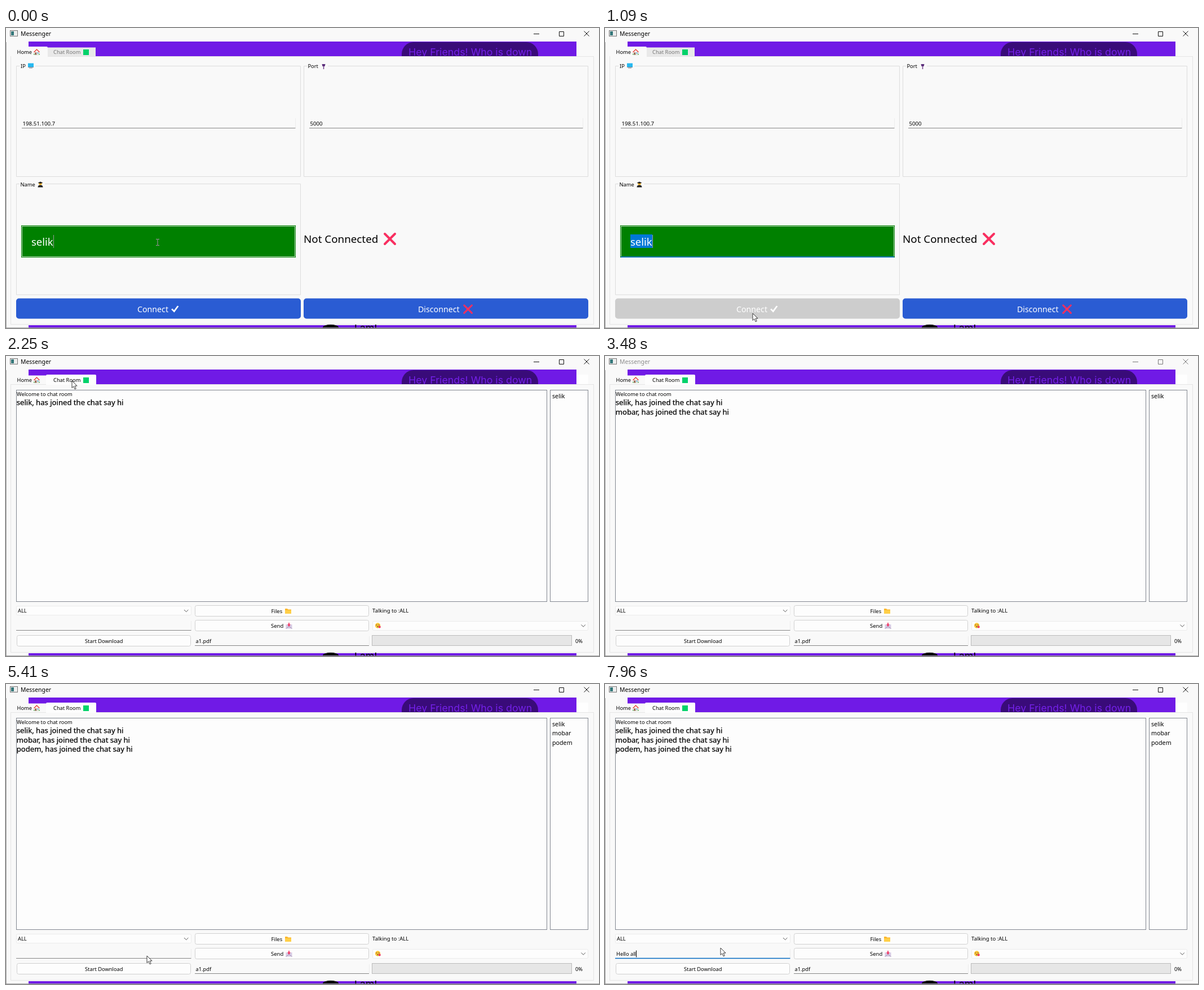
Animation, 1052 px wide and 532 px high, one loop 8000 ms. Source, as an HTML page:

```html
<!DOCTYPE html>
<html lang="en">
<head>
<meta charset="utf-8">
<title>Messenger</title>
<style>
  html, body { margin: 0; width: 100%; height: 100%; overflow: hidden; background: #f9f9f9; }
  svg { display: block; }
  text { font: 9.3px "Noto Sans", sans-serif; fill: #000; white-space: pre; }
  .num { font-size: 9.7px; }
  .title { font-size: 10.4px; }
  .list { font-size: 10.7px; }
  .chat { font-size: 13.1px; stroke: #000; stroke-width: .25px; }
  .button { font-size: 14.2px; fill: #fff; }
  .large { font-size: 18.8px; }
  .behind { font: 17.8px Inter, sans-serif; fill: #7420e8; }
  .group { fill: none; stroke: #dcdcdc; }
  .page { fill: #f9f9f9; }
  .pane { fill: #fdfdfd; stroke: #828790; }
  .soft { fill: #fdfdfd; stroke: #d0d0d0; }
  .combo { fill: #fdfdfd; stroke: #ebebeb; }
  .edge { fill: none; stroke: #ececec; }
  .under { stroke: #868686; }
  .chevron { fill: none; stroke: #555; }
  .blue { fill: #2a5cd3; }
</style>
</head>
<body>
<svg width="1052" height="532" viewBox="0 0 1052 532">
  <defs>
    <g id="house">
      <path d="M0 8.500h11v2H0z" fill="#4fae5a"/>
      <path d="M1.500 5h8v5.500h-8z" fill="#f1e4dc"/>
      <path d="M0 5.500 5.500 0 11 5.500 10 6.500 5.500 2 1 6.500z" fill="#e8403c"/>
      <path d="M2.500 6.500h2.500v4h-2.500z" fill="#8c5543"/>
      <path d="M6.500 6.500h2v2h-2z" fill="#35a6e0"/>
    </g>
    <path id="cross" d="M1 1 19 19M19 1 1 19" fill="none" stroke="#f92f60" stroke-width="4" stroke-linecap="round"/>
  </defs>

  <rect class="page" width="1052" height="532"/>

  <!-- wallpaper window showing through -->
  <path d="M40 24h972V50H40zM40 527h972v4.500H40z" fill="#701ae6"/>
  <path d="M702 50V46a21 21 0 0 1 21-21h200a21 21 0 0 1 21 21v4z" fill="#390b79"/>
  <text class="behind" x="714" y="48.500">Hey Friends! Who is down</text>
  <path d="M562 531a14 5 0 0 1 28 0z"/>
  <text class="behind" x="618" y="538" style="fill:#000">I am!</text>

  <!-- title bar -->
  <g id="titleBar">
    <rect x="7.500" y="4.500" width="13" height="10" fill="#eee" stroke="#777"/>
    <rect x="9" y="6" width="5" height="7" fill="#35777a"/>
    <text class="title" id="title" x="26" y="14">Messenger</text>
    <path id="controls" d="M936 10.500h10M981.500 6.500h8v8h-8zM1025.500 5.500l9 9M1034.500 5.500l-9 9" fill="none" stroke="#111"/>
  </g>

  <rect class="page" x="8.500" y="50.500" width="1034" height="475" stroke="#e5e5e5"/>

  <g id="home">
    <path class="page" d="M9 51V35q0-2 2-2h61q2 0 2 2v16z"/>
    <path d="M74 50V34.500h85V50z" fill="#e9e9e9"/>

    <path class="group" d="M24 67.500h-5.500v196h504v-196H52"/>
    <path class="group" d="M534 67.500h-5.500v196h504v-196H571"/>
    <path class="group" d="M24 276.500h-5.500v196.500h504V276.500H69"/>
    <text x="26" y="70.500">IP</text>
    <text x="535.500" y="70.500">Port</text>
    <text x="25.500" y="280.500">Name</text>

    <path d="M39 62.500h10v7H39z" fill="#26b9f1"/>
    <path d="M41 71h6M39 69.500h10" stroke="#7b8794"/>
    <path d="M560.500 64h6l-1 4h-4z" fill="#5a2d7a"/>
    <path d="M563.500 67v6" stroke="#76458f" stroke-width="1.500"/>
    <circle cx="61" cy="276" r="2.800" fill="#f5b62c"/>
    <path d="M56.500 274.500l4.500-2 4.500 2-4.500 1.500zM56.500 282.500q0-4 4.500-4t4.500 4z" fill="#222"/>

    <path class="edge" d="M513.500 160V177M1023.500 160V177"/>
    <path class="under" d="M28 177.500h485.500M538 177.500h485.500"/>
    <text class="num" x="29.500" y="172.500">198.51.100.7</text>
    <text class="num" x="539.500" y="172.500">5000</text>

    <rect x="27" y="350" width="487" height="57" fill="#008000"/>
    <rect x="28.500" y="351.500" width="484" height="54" fill="none" stroke="#c4dfc4"/>
    <path id="nameFocus" d="M28 406h485" stroke="#0a78b4" stroke-width="2"/>
    <rect id="selection" x="45" y="366" width="39" height="24" fill="#0078d7"/>
    <text class="large" x="45" y="386" style="fill:#fff;font-size:18.500px">selik</text>
    <path id="nameCaret" d="M84.500 367v23" stroke="#999"/>

    <text class="large" id="status" x="528" y="381"></text>
    <use id="offline" href="#cross" x="671" y="364"/>
    <g id="online">
      <rect x="633" y="363.500" width="21" height="21" rx="3" fill="#00d26a"/>
      <path d="M637.500 374.500l4 4 8-9" fill="none" stroke="#fff" stroke-width="2.500" stroke-linecap="round"/>
    </g>

    <rect class="blue" id="connect" x="18" y="479.500" width="505" height="36" rx="5"/>
    <text class="button" x="233" y="503.500">Connect</text>
    <path d="M293 499l2.500-1.500 2.500 3 6-8 2.500 1-8 11z" fill="#fff"/>
    <rect class="blue" x="528" y="479.500" width="505" height="36" rx="5"/>
    <text class="button" x="731" y="503.500">Disconnect</text>
    <use href="#cross" transform="translate(812 491) scale(.76)"/>
  </g>

  <g id="room">
    <path d="M1012 33h21v17h-21z" fill="#fefefe"/>
    <path class="page" d="M10 50V34.500h61V50z"/>
    <path d="M71 51V35q0-2 2-2h85q2 0 2 2v16z" fill="#fdfdfd"/>

    <rect class="pane" x="18.500" y="60.500" width="941" height="375"/>
    <rect class="pane" x="965.500" y="60.500" width="67" height="375"/>
    <text x="19" y="70.500">Welcome to chat room</text>
    <g id="joins"></g>
    <g id="members"></g>

    <rect class="combo" x="18.500" y="443.500" width="310" height="16" rx="2"/>
    <rect class="combo" x="650.500" y="470.500" width="382" height="16" rx="2"/>
    <path class="chevron" d="M316 450l3.700 3.700 3.700-3.700M1020.500 476.500l3.700 3.700 3.700-3.700"/>
    <text x="21" y="455">ALL</text>
    <text x="650" y="455" style="font-size:9.500px">Talking to :ALL</text>

    <rect class="soft" x="335.500" y="442.500" width="308" height="19" rx="3"/>
    <rect class="soft" x="335.500" y="468.500" width="308" height="19" rx="3"/>
    <rect class="soft" x="19.500" y="495.500" width="308" height="19" rx="3"/>
    <text x="470.500" y="455.500" style="font-size:9.500px">Files</text>
    <text x="470" y="482" style="font-size:9.500px">Send</text>
    <text x="140" y="508.500">Start Download</text>

    <path d="M495 448h4l1.500 1.500h5.500v7.500h-11z" fill="#fbb72c"/>
    <path d="M495 451h11v6h-11z" fill="#ffcf48"/>
    <path d="M496.500 476h11v7.500h-11z" fill="#d8cce4"/>
    <path d="M496.500 483.500l5.500-4 5.500 4" fill="none" stroke="#a594b8"/>
    <path d="M502 473v5m-2-2l2 2.500 2-2.500" fill="none" stroke="#f0315f" stroke-width="1.700"/>
    <circle cx="659.500" cy="478" r="4.700" fill="#ffc83a"/>
    <path d="M656.500 477h2M660.500 477h2" stroke="#5b3427"/>
    <circle cx="659.500" cy="480" r="1" fill="#5b3427"/>
    <circle cx="662.800" cy="480.500" r="1.900" fill="#f0315f"/>

    <path class="edge" d="M328.500 470v16M644.500 497v16"/>
    <path class="under" id="entryLine" d="M18 486.500h310.500"/>
    <path class="under" d="M335 513.500h309"/>
    <text id="entry" x="20" y="482"></text>
    <path id="entryCaret" d="M0 472.500v12" stroke="#000"/>
    <text x="336.500" y="508.500">a1.pdf</text>
    <rect x="649.500" y="495.500" width="354" height="18" fill="#e6e6e6" stroke="#bcbcbc"/>
    <text x="1010" y="508.500">0%</text>
  </g>

  <text x="19.500" y="45.500">Home</text>
  <text id="roomLabel" x="84" y="45.700">Chat Room</text>
  <use href="#house" x="49" y="37"/>
  <rect x="137" y="38" width="10" height="10" fill="#00d26a"/>

  <path d="M.500 25V532M0 531.500h1052" stroke="#8b8b8b" stroke-opacity=".7"/>

  <path id="beam" d="M266 374.500h2.500l.500.500.500-.500h2.500M269 375v10M266 385.500h2.500l.500-.500.500.500h2.500" fill="none" stroke="#b08fb0"/>
  <path id="arrow" d="M0 0v12.500l2.900-2.700 2.200 5 2.100-.9-2.100-4.900h4z" fill="#fff" stroke="#222" stroke-width=".9"/>
</svg>

<script>
const LOOP = 8000;
const $ = id => document.getElementById(id);
const show = (id, on) => $(id).setAttribute('visibility', on ? 'inherit' : 'hidden');
const between = (t, from, to) => t >= from && t < to;

// Times when each person's chat line and list entry appear.
const people = [
  { name: 'selik', joined: 0, listed: 0 },
  { name: 'mobar', joined: 3480, listed: 3780 },
  { name: 'podem', joined: 4620, listed: 4770 }
];
people.forEach(({ name }, i) => {
  $('joins').innerHTML +=
    `<text class="chat" x="18.800" y="${86.8 + i * 16.7}">${name}, has joined the chat say hi</text>`;
  $('members').innerHTML +=
    `<text class="list" x="969" y="${74.5 + i * 16.7}">${name}</text>`;
});

const typed = 'Hello all';
const keyTimes = [6250, 6530, 6930, 7080, 7230, 7510, 7660, 7810, 7960];

// The pointer jumps: [time, x, y]; no position means it is outside the window.
const pointer = [
  [0], [550, 268, 392], [690, 267, 418], [820, 266, 450], [960, 264, 486], [1090, 262, 506],
  [1550, 242, 440], [1690, 196, 274], [1830, 138, 98], [1970, 117, 44],
  [2400, 150, 110], [2520, 245, 265], [2650, 350, 420], [2790],
  [5150, 330, 512], [5290, 290, 496], [5410, 250, 482], [5560, 228, 475],
  [5710, 212, 470], [5840, 205, 468]
];

function render(t) {
  const inRoom = t >= 2250;
  const connected = t >= 1240;
  const inactive = between(t, 3480, 5020);

  show('home', !inRoom);
  show('room', inRoom);
  $('title').style.fill = inactive ? '#8c8c8c' : '#000';
  $('controls').setAttribute('stroke', inactive ? '#777' : '#111');
  $('roomLabel').style.fill = connected ? '#000' : '#777';

  show('selection', !inRoom && between(t, 120, 1240));
  show('nameCaret', !connected);
  show('nameFocus', between(t, 550, 1240));
  $('status').textContent = connected ? 'Connected' : 'Not Connected';
  show('offline', !connected);
  show('online', connected && !inRoom);
  $('connect').style.fill = between(t, 960, 1240) ? '#cdcdcd' : '';

  people.forEach(({ joined, listed }, i) => {
    $('joins').children[i].style.display = t >= joined ? '' : 'none';
    $('members').children[i].style.display = t >= listed ? '' : 'none';
  });

  const count = keyTimes.filter(time => t >= time).length;
  const entry = $('entry');
  entry.textContent = typed.slice(0, count);
  show('entryCaret', count > 0);
  const caretX = count ? Math.round(20 + entry.getComputedTextLength()) + .5 : 0;
  $('entryCaret').setAttribute('transform', `translate(${caretX})`);
  const focused = t >= 6130;
  $('entryLine').style.stroke = count ? '#0067c0' : focused ? '#3d9be0' : '';
  $('entryLine').style.strokeWidth = focused ? 1.6 : 1;

  const [, x, y] = pointer.findLast(([time]) => t >= time);
  show('beam', t < 550);
  show('arrow', x !== undefined);
  if (x !== undefined) $('arrow').setAttribute('transform', `translate(${x} ${y})`);
}

const start = performance.now();
function tick() {
  render((performance.now() - start) % LOOP);
  requestAnimationFrame(tick);
}
tick();
</script>
</body>
</html>
```
